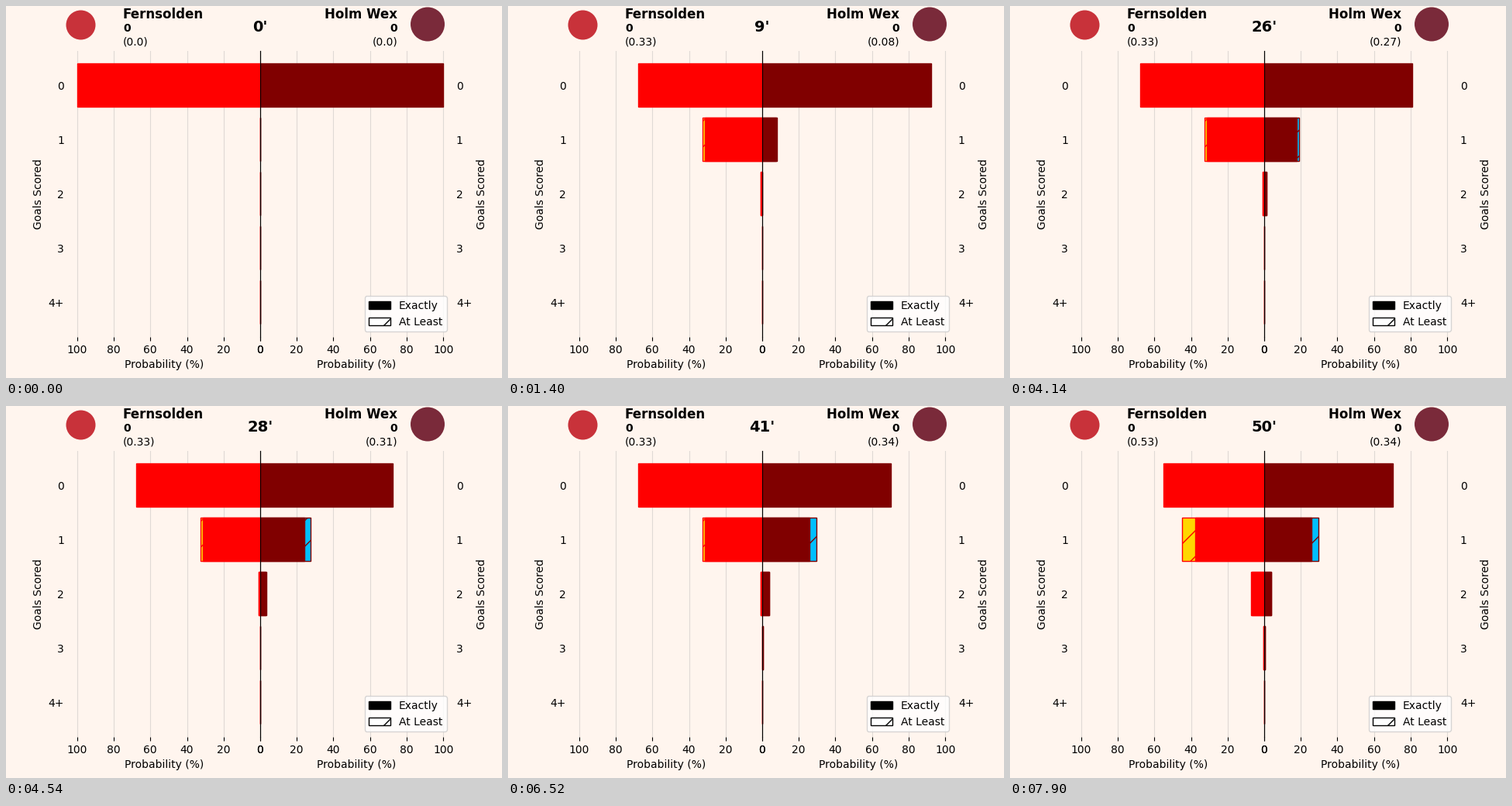
Write a matplotlib script that moves like this. It is 640x480 px and loops after 8 s.

```python
import matplotlib.pyplot as plt
import numpy as np
from matplotlib.animation import FuncAnimation
from matplotlib.patches import Circle, Patch

W, H, DPI = 640, 480, 100
LOOP, STEP = 8000, 20
HOLD, SUB, SUBS = 160, 30, 5  # quiet minute; busy minute = SUBS short steps
ROWS = np.arange(5)

# minute -> chance quality of the shot
HOME = {5: 0.304, 6: 0.029, 43: 0.125, 47: 0.07}
AWAY = {2: 0.05, 4: 0.03, 24: 0.083, 26: 0.107, 28: 0.04, 39: 0.028}
BUSY = set(HOME) | set(AWAY)

STARTS = [0]
for m in range(50):
    STARTS.append(STARTS[-1] + (SUBS * SUB if m in BUSY else HOLD))


def goal_odds(shots, minute, part):
    """Percent chance of 0, 1, 2, 3 and 4+ goals, the current shot weighted by part."""
    odds = np.array([1.0])
    for m, p in shots.items():
        if m <= minute:
            p *= part if m == minute else 1
            odds = np.convolve(odds, [1 - p, p])
    odds = np.append(odds, np.zeros(5))
    return 100 * np.append(odds[:4], odds[4:].sum())


fig = plt.figure(figsize=(W / DPI, H / DPI), dpi=DPI, facecolor="seashell")
left, right = fig.subplots(1, 2, gridspec_kw={"wspace": 0})

for ax, side in ((left, "left"), (right, "right")):
    ax.set_facecolor("seashell")
    ax.set_xlim((105, 0) if side == "left" else (0, 105))
    ax.set_ylim(4.64, -0.64)
    ax.set_xticks(range(0, 101, 20))
    ax.set_yticks(ROWS, ["0", "1", "2", "3", "4+"])
    ax.tick_params(axis="y", length=0)
    ax.set_axisbelow(True)
    ax.grid(axis="x", alpha=0.4)
    ax.set_xlabel("Probability (%)")
    ax.set_ylabel("Goals Scored")
    for name in ("top", "bottom", side):
        ax.spines[name].set_visible(False)
right.yaxis.tick_right()
right.yaxis.set_label_position("right")
right.tick_params(axis="y", length=0)
legend = right.legend(
    handles=[
        Patch(facecolor="black", edgecolor="black", label="Exactly"),
        Patch(facecolor="white", edgecolor="black", hatch="/", label="At Least"),
    ],
    loc="lower right",
)

# Render the fixed chart furniture once and keep it as a backdrop
fig.canvas.draw()
backdrop = np.array(fig.canvas.buffer_rgba())
legend.remove()
for ax in (left, right):
    ax.set_axis_off()
fig.figimage(backdrop, zorder=-1)


def label(x, y, text, size=10, ha="left", weight="normal"):
    return fig.text(x / W, 1 - y / H, text, fontsize=size, ha=ha,
                    va="baseline", weight=weight)


def badge(x, y, r, color):
    fig.add_artist(Circle((x, H - y), r, color=color, lw=0, transform=None))


class Team:
    def __init__(self, ax, shots, name, x, ha, color, accent):
        self.shots = shots
        self.at_least = ax.barh(ROWS[1:], 0, color=accent, edgecolor=color, hatch="/")
        self.exactly = ax.barh(ROWS, 0, color=color, edgecolor=color)
        label(x, 15.5, name, 12, ha, "bold")
        label(x, 33, "0", 10, ha, "bold")
        self.total = label(x, 50, "", 10, ha)

    def show(self, minute, part):
        odds = goal_odds(self.shots, minute, part)
        for bar, p in zip(self.exactly, odds):
            bar.set_width(p)
        for bar, p in zip(self.at_least, odds[::-1].cumsum()[::-1][1:]):
            bar.set_width(p)
        xg = sum(p for m, p in self.shots.items() if m <= minute)
        self.total.set_text(f"({round(float(xg), 2)})")


teams = [
    Team(left, HOME, "Fernsolden", 150.9, "left", "red", "gold"),
    Team(right, AWAY, "Holm Wex", 505.1, "right", "maroon", "deepskyblue"),
]
for ax in (left, right):
    ax.set_ylim(4.64, -0.64)
left.set_xlim(105, 0)
right.set_xlim(0, 105)
right.axvline(0, color="black", lw=0.8, zorder=3)
badge(96.5, 24.5, 19, "#c8323a")
badge(544, 23.5, 22, "#7a2a3a")
clock = label(328, 33, "", 14, "center", "bold")


def update(i):
    t = i * STEP + STEP / 2
    minute = int(np.searchsorted(STARTS, t, side="right")) - 1
    part = min(1, ((t - STARTS[minute]) // SUB + 1) / SUBS)
    clock.set_text(f"{minute}'")
    for team in teams:
        team.show(minute, part)
    return []


anim = FuncAnimation(fig, update, frames=LOOP // STEP, interval=STEP,
                     repeat=True, repeat_delay=0, blit=False)
plt.show()
```
